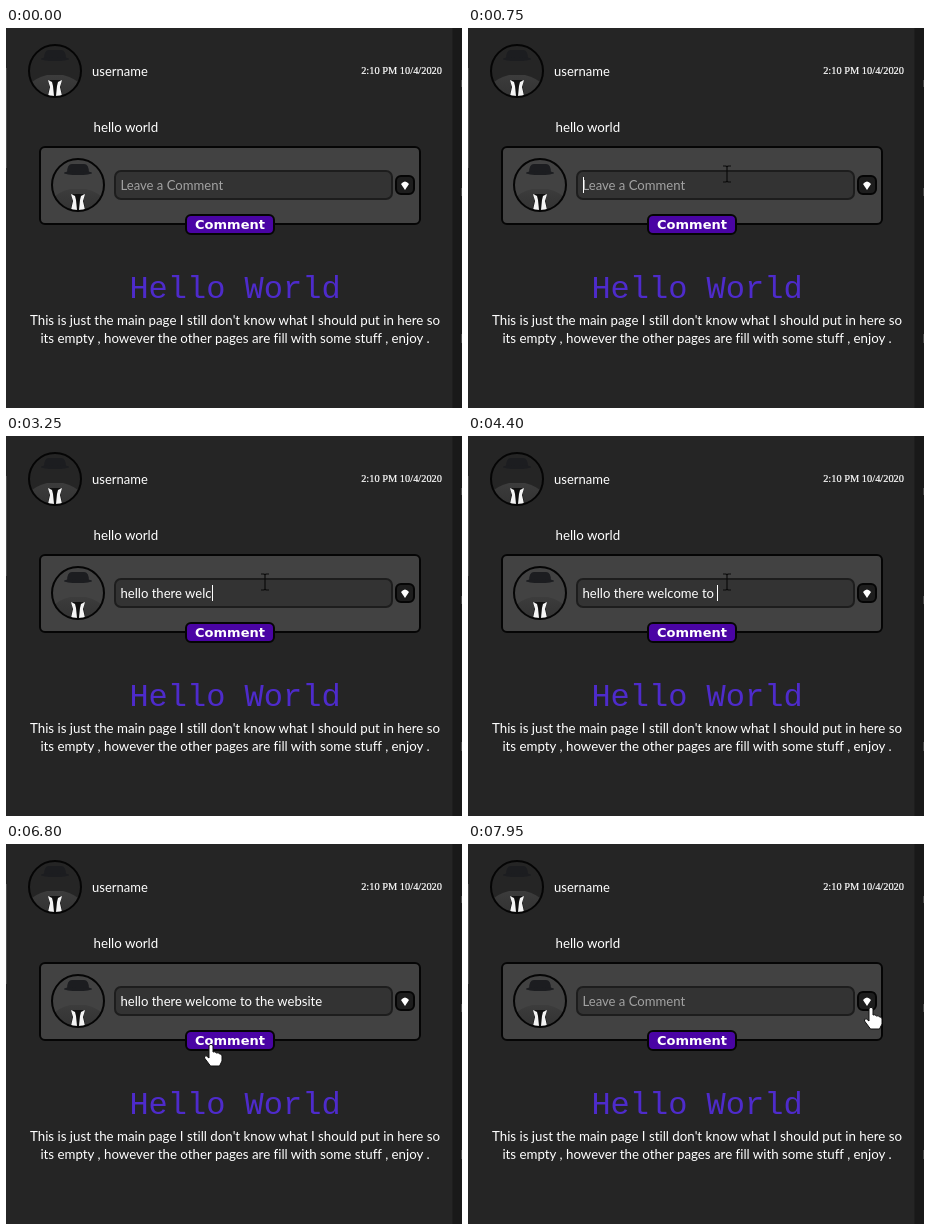
Recreate the animation shown at these times as an HTML page. Size 456x380 px, loop 8000 ms.

```html
<!DOCTYPE html>
<html lang="en">
<head>
<meta charset="utf-8">
<title>Comment box</title>
<style>
  html, body { margin: 0; width: 100%; height: 100%; overflow: hidden; background: #252525; }
  svg { display: block; width: 456px; height: 380px; }
  text { font-family: Lato, "Open Sans", sans-serif; font-variant-ligatures: none; fill: #fff; }
  .body { font-size: 13.3px; }
  .name { font-size: 13px; }
  .date { font: 10.4px "Liberation Serif", serif; stroke: #fff; stroke-width: .2; }
  .field { font-size: 13.1px; }
  .title { font: 32px "Liberation Mono", monospace; fill: #4e2bcb; }
  .button { font: bold 13px "DejaVu Sans", sans-serif; }
  .mid { text-anchor: middle; }
  .box { stroke: #050505; stroke-width: 2; }
</style>
</head>
<body>
<svg viewBox="0 0 456 380">
  <defs>
    <clipPath id="disc"><circle r="26"/></clipPath>
    <linearGradient id="suit" x1="0" y1="0" x2="0" y2="1">
      <stop offset="0" stop-color="#3c3c3c"/>
      <stop offset="1" stop-color="#323232"/>
    </linearGradient>
    <path id="lapel" d="M-7 9L-3 11L-2 15L-1 25H-7L-5 16Z" fill="#f4f4f4"/>
    <g id="avatar">
      <g clip-path="url(#disc)">
        <path d="M-11-12Q-11-21-6-21H6Q11-21 11-12Z" fill="#1c1d20"/>
        <ellipse cy="-12" rx="14" ry="2" fill="#1c1d20"/>
        <path d="M-26 27V14Q-20 7-8 4H8Q20 7 26 14V27Z" fill="url(#suit)"/>
        <path d="M-5 9H5L7 25H-7Z" fill="#101010"/>
        <use href="#lapel"/>
        <use href="#lapel" transform="scale(-1 1)"/>
      </g>
      <circle r="26" fill="none" stroke="#050505" stroke-width="2"/>
    </g>
  </defs>

  <rect width="456" height="380" fill="#252525"/>
  <rect x="446.5" width="10" height="380" fill="#191919"/>
  <path d="M.5 40V140" stroke="#484848"/>
  <path d="M455.5 52v7M455.5 160v8M455.5 306v9" stroke="#444"/>

  <use href="#avatar" x="49" y="43"/>
  <text class="name" x="86" y="48">username</text>
  <text class="date" x="436" y="46" text-anchor="end">2:10 PM 10/4/2020</text>
  <text class="body" x="87.5" y="104">hello world</text>

  <rect class="box" x="34" y="119" width="380" height="77" rx="5" fill="#424242"/>
  <use href="#avatar" x="72" y="157"/>
  <rect x="109" y="143" width="277" height="28" rx="6" fill="#333" stroke="#1d1d1d" stroke-width="2"/>
  <rect class="box" x="390" y="148" width="18" height="18" rx="5" fill="#1d1d1d"/>
  <path d="M395 156Q399 151 403 156L399 162Z" fill="#fff"/>
  <rect class="box" x="180" y="187" width="88" height="19" rx="5" fill="#4a04a4"/>
  <text class="button mid" x="224" y="201">Comment</text>

  <text class="field" id="field" x="114.5" y="162"></text>
  <path id="caret" d="M.5 149V165" stroke="#fff"/>

  <text class="title mid" x="229" y="270">Hello World</text>
  <text class="body mid" x="229" y="297">This is just the main page I still don't know what I should put in here so</text>
  <text class="body mid" x="229" y="315">its empty , however the other pages are fill with some stuff , enjoy .</text>

  <g id="pointer">
    <path id="beam" d="M-4-8H-1L0-7L1-8H4M0-7V7M-4 8H-1L0 7L1 8H4" fill="none" stroke="#0a0a0a" stroke-width="1.2"/>
    <path id="arrow" d="M0 0V16L4 12.5L6.5 18L9 17L6.5 11.5H11.5Z" fill="#fff" stroke="#111"/>
    <path id="hand" d="M-2 1.5Q0-1 2 1.5V8Q4 7 5.5 9Q7.5 8 8.5 10Q11 9.5 11 12V17L8.5 22H-.5L-6.5 14Q-7 11-4.5 12L-2 14Z"
      fill="#fff" stroke="#111"/>
  </g>
</svg>
<script>
const LOOP = 8000;
const MESSAGE = "hello there welcome to the website";
const FOCUS = 700, CLICK = 6900, CLEAR = 7150;

// One time per typed character.
const keys = [
  950, 1150, 1300, 1450, 1600, 1750,
  2000, 2100, 2250, 2350, 2450, 2550,
  2700, 2900, 3100, 3250, 3400, 3600, 3800, 4000,
  4150, 4300, 4400, 4800, 4950, 5100, 5250,
  5400, 5550, 5650, 5850, 5950, 6050, 6150
];

// Pointer moves: start, end, from, to.
const moves = [
  [100, 620, [310, 400], [259, 146]],
  [6350, 6750, [259, 146], [205, 200]],
  [7250, 7800, [205, 200], [403, 163]]
];

const $ = id => document.getElementById(id);
const field = $("field"), caret = $("caret"), pointer = $("pointer");
const show = (el, on) => el.setAttribute("visibility", on ? "visible" : "hidden");
const ease = p => p * p * (3 - 2 * p);
const inside = ([x, y], l, t, r, b) => x >= l && x <= r && y >= t && y <= b;

function pointerAt(t) {
  const [start, end, from, to] = moves.filter(m => t >= m[0]).pop() || moves[0];
  const p = ease(Math.min(1, Math.max(0, (t - start) / (end - start))));
  return from.map((v, i) => v + (to[i] - v) * p);
}

function shapeAt(pos) {
  if (inside(pos, 179, 186, 269, 207) || inside(pos, 389, 147, 409, 167)) return "hand";
  return inside(pos, 108, 142, 387, 172) ? "beam" : "arrow";
}

function drawField(t) {
  const count = t < CLEAR ? keys.filter(k => k <= t).length : 0;
  field.textContent = count
    ? MESSAGE.slice(0, count).replace(/ /g, "\u00a0")
    : "Leave a Comment";
  field.style.fill = count ? "#fff" : "#a2a2a2";

  const lastKey = count ? keys[count - 1] : FOCUS;
  const lit = Math.floor((t - lastKey) / 500) % 2 === 0;
  const width = count ? field.getComputedTextLength() : 0;
  caret.setAttribute("transform", `translate(${Math.round(114.5 + width)} 0)`);
  show(caret, t >= FOCUS && t < CLICK && lit);
}

function drawPointer(t) {
  const pos = pointerAt(t), shape = shapeAt(pos);
  pointer.setAttribute("transform", `translate(${pos})`);
  for (const id of ["beam", "arrow", "hand"]) show($(id), id === shape);
}

function frame() {
  const t = performance.now() % LOOP;
  drawField(t);
  drawPointer(t);
  requestAnimationFrame(frame);
}
frame();
</script>
</body>
</html>
```
